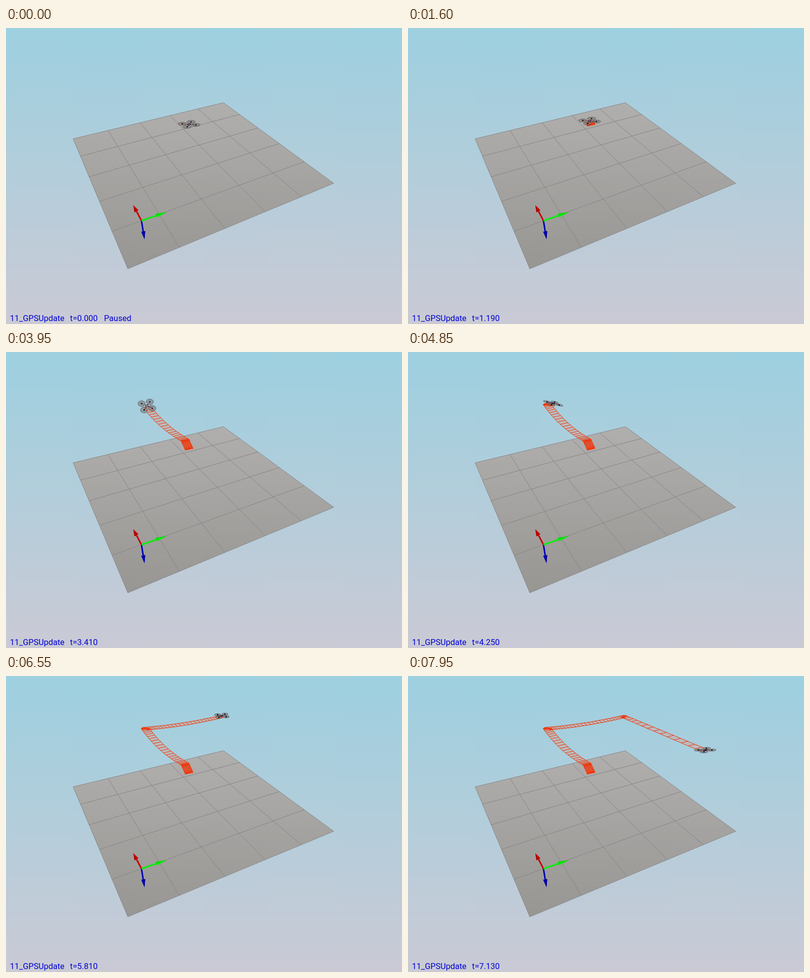
An HTML page with a canvas that plays this animation: 798 px wide and 599 px high, repeating every 8 s.

```html
<!DOCTYPE html>
<html lang="en">
<head>
<meta charset="utf-8">
<title>Quadrotor trajectory</title>
<style>
html, body { margin: 0; width: 100%; height: 100%; overflow: hidden; }
canvas { display: block; }
</style>
</head>
<body>
<canvas id="stage" width="798" height="599"></canvas>
<script>
const ctx = document.getElementById('stage').getContext('2d');
const LOOP = 8000, TICK = 50, START = 350, STEPS_PER_MS = 0.01555;

// Each leg eases from the end of the one before to `to` = [x, y, size],
// sagging by `bow`; the drone leans with its acceleration.
const HOME = [369, 195, 1.1];
const LEGS = [
  { from: 10, until: 34, to: [361, 177, 1.1], bow: [0, 0], pitch: 0, roll: 0 },
  { from: 37, until: 60, to: [281, 105, 1.03], bow: [-8, 9], pitch: -1, roll: 0 },
  { from: 66, until: 96, to: [435, 80.5, 0.82], bow: [0, 6], pitch: 0, roll: 1 },
  { from: 103.5, until: 127.5, to: [665, 178, 1.08], bow: [0, 0], pitch: 1, roll: 0 }
];

const clamp = v => Math.min(1, Math.max(0, v));
const smooth = s => s * s * (3 - 2 * s);
const ramp = (from, until, t) => clamp((t - from) / (until - from));

// Position and the two body axes, in screen space, at a simulation step
function stateAt(step) {
  let [x, y, size] = HOME, pitch = 0, roll = 0;
  for (const leg of LEGS) {
    const s = ramp(leg.from, leg.until, step), e = smooth(s), sag = 2 * e * (1 - e);
    x += (leg.to[0] - x) * e + leg.bow[0] * sag;
    y += (leg.to[1] - y) * e + leg.bow[1] * sag;
    size += (leg.to[2] - size) * e;
    const lean = Math.cos(Math.PI * s) * Math.min(1, 8 * s * (1 - s));
    pitch += leg.pitch * lean;
    roll += leg.roll * lean;
    if (s < 1) break;
  }

  // Quarter turns at the corners keep the nose along the path
  const yaw = Math.PI / 2 * (smooth(ramp(58, 67, step)) + smooth(ramp(94, 104, step)));
  const c = Math.cos(yaw), n = Math.sin(yaw);
  const tail = [(9 - 5 * pitch) * size, 5.5 * Math.exp(pitch) * size];
  const side = [(16 - roll) * size, (-3.5 + 5 * roll) * size];
  return {
    x, y,
    tail: tail.map((v, i) => v * c - side[i] * n),
    side: side.map((v, i) => v * c + tail[i] * n)
  };
}

function trace(points, close) {
  ctx.beginPath();
  points.forEach(([x, y]) => ctx.lineTo(x, y));
  if (close) ctx.closePath();
}

function line(from, to) {
  trace([from, to]);
  ctx.stroke();
}

function dot(x, y, r, color) {
  ctx.beginPath();
  ctx.arc(x, y, r, 0, Math.PI * 2);
  ctx.fillStyle = color;
  ctx.fill();
}

function vertical(y0, y1, top, bottom) {
  const g = ctx.createLinearGradient(0, y0, 0, y1);
  g.addColorStop(0, top);
  g.addColorStop(1, bottom);
  return g;
}

// Perspective map of the unit square onto the ground plate
function ground(u, v) {
  const w = 1 + 0.2086 * u - 0.3815 * v;
  return [(135.3 + 394.4 * u + 16.5 * v) / w, (224.2 - 41.5 * u + 77.2 * v) / w];
}

function drawGround() {
  ctx.fillStyle = vertical(0, 599, '#9dd0e0', '#cacad5');
  ctx.fillRect(0, 0, 798, 599);

  trace([ground(0, 0), ground(1, 0), ground(1, 1), ground(0, 1)], true);
  ctx.fillStyle = vertical(151, 487, '#b0afad', '#989693');
  ctx.fill();
  ctx.strokeStyle = '#868584';
  ctx.lineWidth = 1;
  for (let i = 0; i <= 5; i++) {
    line(ground(i / 5, 0), ground(i / 5, 1));
    line(ground(0, i / 5), ground(1, i / 5));
  }
}

function drawArrow(x, y, head, half, color, shade) {
  const ox = 273, oy = 390, len = Math.hypot(x - ox, y - oy);
  const ux = (x - ox) / len, uy = (y - oy) / len;
  const bx = x - ux * head, by = y - uy * head;
  const wing = side => [bx - uy * half * side, by + ux * half * side];
  ctx.strokeStyle = color;
  ctx.lineWidth = 3;
  line([ox, oy], [bx, by]);
  trace([[x, y], wing(1), wing(-1)], true);
  ctx.fillStyle = color;
  ctx.fill();
  trace([[x, y], [bx, by], wing(-1)], true);
  ctx.fillStyle = shade;
  ctx.fill();
}

function drawAxes() {
  drawArrow(256.5, 358.5, 14, 4.5, '#c40000', '#b00000');
  drawArrow(279, 427.5, 16, 4.2, '#0000b4', '#0000a0');
  drawArrow(324, 372.5, 22, 3.8, '#00f000', '#00dc00');
}

function drawRibbon(last) {
  const left = [], right = [];
  for (let k = 0; k <= last; k++) {
    const { x, y, side } = stateAt(k), dx = side[0] * 0.45, dy = side[1] * 0.45;
    left.push([x - dx, y + 1.5 - dy]);
    right.push([x + dx, y + 1.5 + dy]);
  }
  ctx.fillStyle = 'rgba(205, 172, 162, 0.5)';
  for (let k = 1; k <= last; k++) {
    trace([left[k - 1], right[k - 1], right[k], left[k]], true);
    ctx.fill();
  }
  ctx.strokeStyle = '#f03408';
  ctx.lineWidth = 1;
  left.forEach((p, k) => line(p, right[k]));
  for (const rail of [left, right]) {
    trace(rail);
    ctx.stroke();
  }
}

function drawDrone(step) {
  const { x, y, tail, side } = stateAt(step);
  const a = tail.map((v, i) => (v + side[i]) / 2);
  const b = tail.map((v, i) => (v - side[i]) / 2);
  const arms = [a, b, a.map(v => -v), b.map(v => -v)];

  for (const [dx, dy] of arms) {
    ctx.save();
    ctx.translate(x + dx, y + dy);
    ctx.transform(...a, ...b, 0, 0);
    ctx.beginPath();
    ctx.arc(0, 0, 0.6, 0, Math.PI * 2);
    ctx.restore();
    ctx.fillStyle = 'rgba(116, 116, 116, 0.55)';
    ctx.fill();
    ctx.strokeStyle = '#555';
    ctx.lineWidth = 0.8;
    ctx.stroke();
  }

  arms.forEach(([dx, dy], i) => {
    ctx.strokeStyle = i < 2 ? '#44444c' : '#a8452c';
    ctx.lineWidth = 1;
    line([x, y], [x + dx, y + dy]);
    dot(x + dx, y + dy, 1.4, '#0c0c14');
  });

  trace(arms.map(([dx, dy]) => [x + dx * 0.25, y + dy * 0.25]), true);
  ctx.fillStyle = '#e4e4ee';
  ctx.fill();
  ctx.strokeStyle = '#14143c';
  ctx.lineWidth = 1.2;
  ctx.stroke();
}

function drawLabel(step) {
  const time = Math.max(0, step * 0.06 - 0.01);
  ctx.font = '16.5px Roboto, "Liberation Sans", sans-serif';
  ctx.fillStyle = '#0000d4';
  ctx.fillText('11_GPSUpdate', 8, 593);
  ctx.fillText('t=' + time.toFixed(3), 129, 593);
  if (!step) ctx.fillText('Paused', 197.5, 593);
}

function draw() {
  const ms = Math.floor(performance.now() % LOOP / TICK) * TICK;
  const step = ms < START ? 0 : Math.round(1 + (ms - START) * STEPS_PER_MS);
  drawGround();
  drawAxes();
  if (step) drawRibbon(step);
  drawDrone(step);
  drawLabel(step);
  requestAnimationFrame(draw);
}
draw();
</script>
</body>
</html>
```
